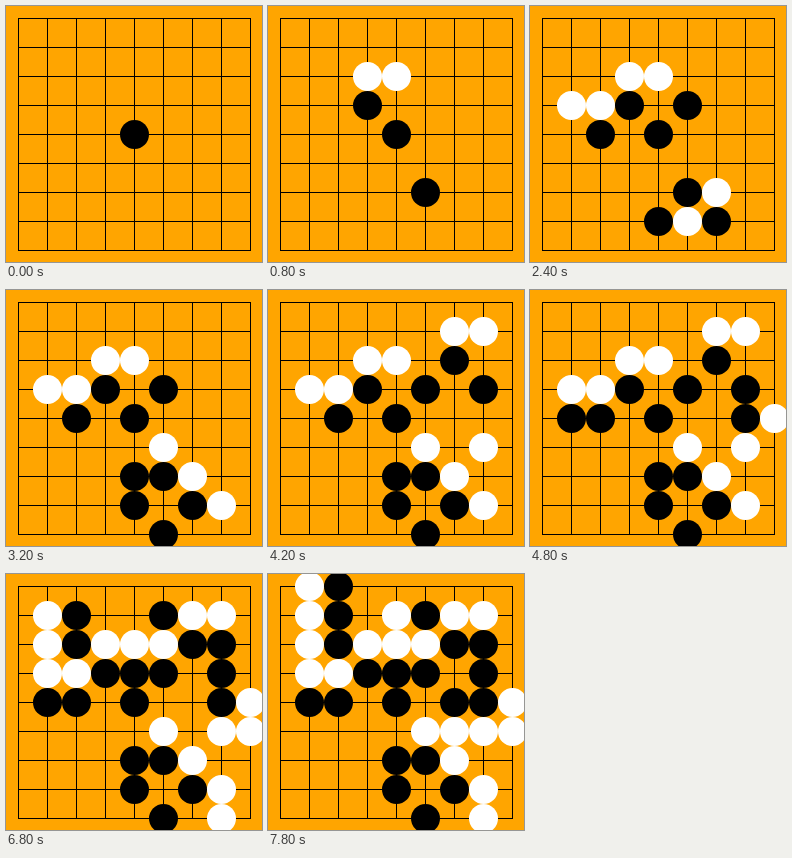
Animation, 256 px wide and 256 px high, one loop 8 s. Source, as an HTML page with a canvas:

```html
<!DOCTYPE html>
<html lang="en">
<head>
<meta charset="utf-8">
<title>Go game</title>
<style>
  html, body { margin: 0; width: 100%; height: 100%; overflow: hidden; background: #ffa500; }
  canvas { display: block; width: 256px; height: 256px; }
</style>
</head>
<body>
<canvas id="board" width="256" height="256"></canvas>
<script>
const ctx = document.getElementById('board').getContext('2d');
const SIZE = 9, CELL = 29, MARGIN = 12, RADIUS = 14.5, MOVE_MS = 200;

// Column and row of each move; black plays first.
const moves = `44 32 56 42 33 23 24 13 53 66
  67 57 47 77 58 55 46 61 62 71
  73 75 14 84 74 85 72 78 51 52
  22 12 21 11 43 41 64 65 20 10`.split(/\s+/);

const lineAt = i => MARGIN + i * CELL;

function neighbours(point) {
  const [col, row] = [...point].map(Number);
  return [[col - 1, row], [col + 1, row], [col, row - 1], [col, row + 1]]
    .filter(([c, r]) => c >= 0 && r >= 0 && c < SIZE && r < SIZE)
    .map(([c, r]) => `${c}${r}`);
}

function captureIfSurrounded(stones, start) {
  const group = new Set([start]);
  for (const point of group) {
    for (const next of neighbours(point)) {
      if (!stones.has(next)) return;
      if (stones.get(next) === stones.get(start)) group.add(next);
    }
  }
  group.forEach(point => stones.delete(point));
}

function position(count) {
  const stones = new Map();
  moves.slice(0, count).forEach((point, i) => {
    const color = i % 2 ? 'white' : 'black';
    stones.set(point, color);
    for (const next of neighbours(point)) {
      if (stones.has(next) && stones.get(next) !== color) captureIfSurrounded(stones, next);
    }
  });
  return stones;
}

function drawGrid() {
  ctx.fillStyle = '#ffa500';
  ctx.fillRect(0, 0, 256, 256);
  ctx.fillStyle = 'black';
  const length = (SIZE - 1) * CELL + 1;
  for (let i = 0; i < SIZE; i++) {
    ctx.fillRect(lineAt(i), MARGIN, 1, length);
    ctx.fillRect(MARGIN, lineAt(i), length, 1);
  }
}

function drawStone(color, [col, row]) {
  ctx.fillStyle = color;
  ctx.beginPath();
  ctx.arc(lineAt(+col) + 0.5, lineAt(+row) + 0.5, RADIUS, 0, 2 * Math.PI);
  ctx.fill();
}

function draw() {
  const step = Math.floor(performance.now() / MOVE_MS) % moves.length;
  drawGrid();
  position(step + 1).forEach(drawStone);
  requestAnimationFrame(draw);
}
draw();
</script>
</body>
</html>
```
